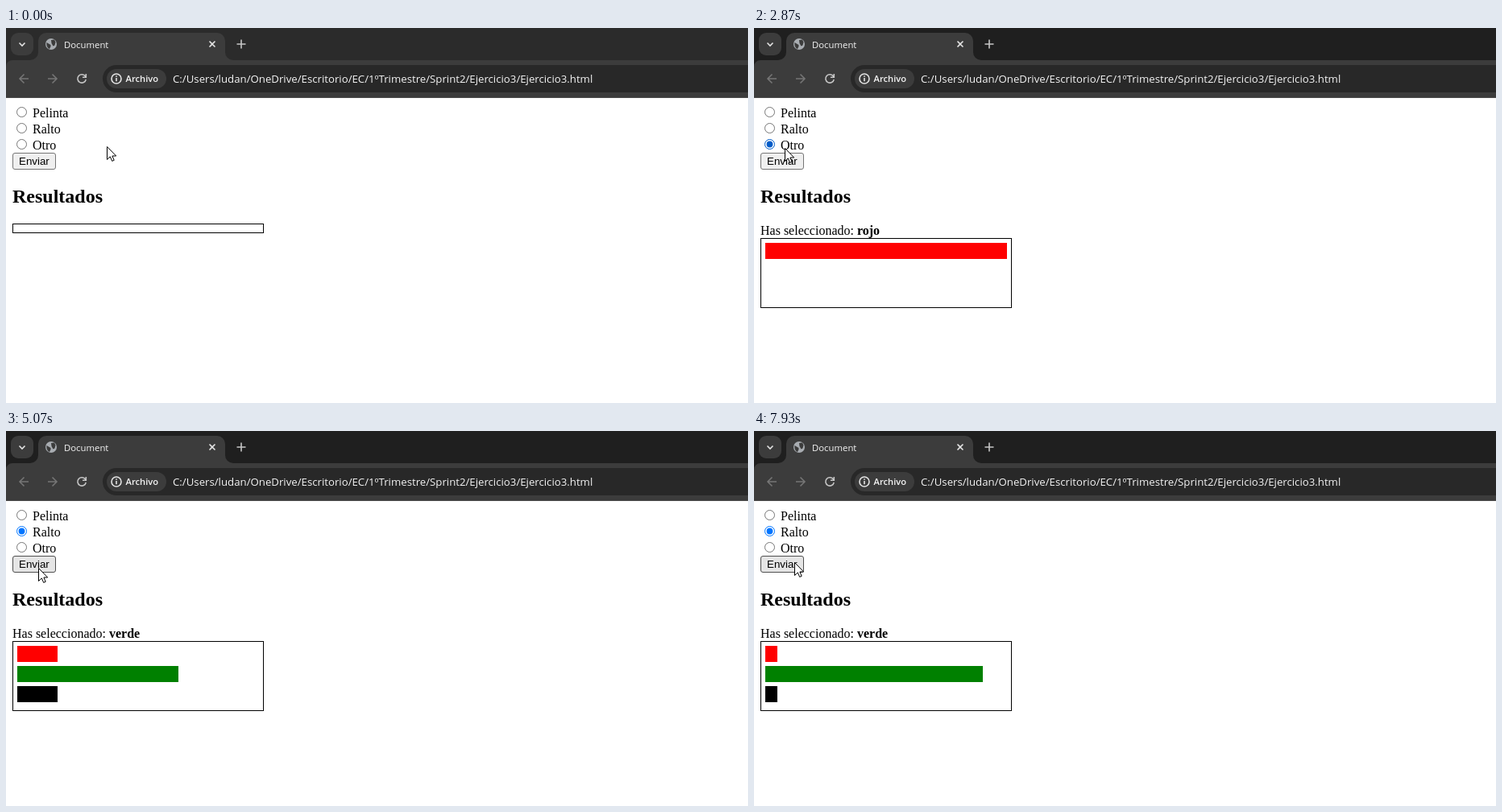
An HTML page that plays this animation: 921x466 px, repeating every 8000 ms.

```html
<!DOCTYPE html>
<html lang="es">
<head>
<meta charset="utf-8">
<title>Document</title>
<style>
  html, body { margin: 0; width: 100%; height: 100%; overflow: hidden; background: #fff; }
  svg { display: block; width: 100%; height: 100%; }
  text { white-space: pre; }
  .ui { font-family: "Open Sans", "Noto Sans", sans-serif; fill: #f4f4f4; }
  .page { font: 16px "Liberation Serif", "Times New Roman", serif; }
  .control { font: 13.333px "Liberation Sans", Arial, sans-serif; }
  .icon { fill: none; stroke: #c7c7c7; stroke-width: 1.6; }
  .dim { stroke: #757575; }
  .bright { stroke: #e3e3e3; }
</style>
</head>
<body>
<svg viewBox="0 0 921 466" xmlns="http://www.w3.org/2000/svg">
  <rect width="921" height="466" fill="#fff"/>

  <!-- Tab strip -->
  <rect id="strip" width="921" height="60"/>
  <rect x="6" y="6" width="28" height="28" rx="9" fill="#3c3c3c"/>
  <path class="icon bright" d="M16.5 18.5l3.5 3.5 3.5-3.5"/>
  <path d="M0 87V48a8 8 0 0 1 8-8H30a10 10 0 0 0 10-10V16a10 10 0 0 1 10-10H262a10 10 0 0 1 10 10V30a10 10 0 0 0 10 10H921V87Z" fill="#3c3c3c"/>
  <circle cx="56" cy="20" r="7" fill="#a9adb2"/>
  <path d="M50.5 18l5 3v2l-1.5 3c-3-1-4-5-3.5-8ZM56 15l4-.5 1.5 3-1 4-2 1-2-3.5Z" fill="#3c3c3c"/>
  <text class="ui" x="72" y="25" font-size="11.35">Document</text>
  <path class="icon bright" d="M252.5 16.5l7 7m0-7l-7 7"/>
  <path class="icon" d="M286.5 20h11m-5.500-5.500v11"/>

  <!-- Toolbar -->
  <path class="icon dim" d="M28 63H17m5.500-5.500L17 63l5.500 5.500"/>
  <path class="icon dim" d="M52 63H63m-5.500-5.500L63 63l-5.500 5.500"/>
  <path class="icon" d="M98.5 60.2a5.200 5.200 0 1 0 .7 3.600M99.300 57v4.200H95"/>
  <rect x="120" y="46" width="830" height="34" rx="17" fill="#282828"/>
  <rect x="125" y="51" width="74" height="24" rx="12" fill="#3c3c3c"/>
  <circle class="icon bright" cx="137" cy="63" r="6"/>
  <path class="icon bright" d="M137 62v4.200m0-7v1.500"/>
  <text class="ui" x="148.5" y="67" font-size="11.2" font-weight="600">Archivo</text>
  <text class="ui" x="207" y="68" font-size="13.23">C:/Users/ludan/OneDrive/Escritorio/EC/1ºTrimestre/Sprint2/Ejercicio3/Ejercicio3.html</text>
  <rect y="86" width="921" height="1" fill="#4a4a4a"/>

  <!-- Form -->
  <g id="radios" class="page"></g>
  <rect id="button" x="8.5" y="155.5" width="53" height="20" rx="2.5"/>
  <text class="control" x="16" y="170">Enviar</text>

  <!-- Results -->
  <g class="page">
    <text x="8" y="217" font-size="24" font-weight="700">Resultados</text>
    <text id="answer" x="8" y="257">Has seleccionado: <tspan id="choice" font-weight="700"></tspan></text>
  </g>
  <rect id="frame" x="8.5" width="311" fill="none" stroke="#000"/>
  <g id="bars"></g>

  <path id="cursor" d="M.5 .5v16l3.800-3.600 2.400 5.500 2.500-1.100L6.900 12h4.800Z" fill="#fff" stroke="#000"/>
</svg>
<script>
const LOOP = 8000, TICKS_PER_MS = 0.015, ROW = 20, BAR_MAX = 300, BUTTON = 3;
const options = [
  { label: "Pelinta", name: "rojo", color: "#f00" },
  { label: "Ralto", name: "verde", color: "#008000" },
  { label: "Otro", name: "negro", color: "#000" }
];

// Border and fill by mood: idle, hovered, pressed
const greys = ["#767676", "#4f4f4f", "#8d8d8d"];
const blues = ["#0075ff", "#005cc8", "#3795ff"];
const faces = ["#efefef", "#e5e5e5", "#f5f5f5"];

// The pointer's script, in ticks
const moves = [], clicks = [];
const move = (start, end, x, y) => moves.push({ start, end, x, y });
const click = (press, release) => clicks.push({ press, release });

move(0, 4, 54, 108);
click(11, 12);
move(12, 15, 45, 186);
move(17, 20, 30, 169);
click(22, 24);
move(24, 28, 16, 128);
click(29, 30);
move(30, 32, 39, 148);
click(34, 35);
move(38, 41, 38, 149);
move(43, 46, 37, 167);
click(47, 49);
move(49, 55, 44, 125);
click(56, 57);
move(57, 60, 47, 186);
move(61, 63, 40, 170);
// Steady rapid clicking on the button
for (let i = 0; i < 18; i++) {
  const release = 67 + Math.ceil(i * 2.75);
  click(release - 1, release);
}
move(116, 119, 50, 163);

const $ = id => document.getElementById(id);

function set(el, attrs) {
  for (const key in attrs) el.setAttribute(key, attrs[key]);
}

function make(parent, tag, attrs) {
  const el = document.createElementNS("http://www.w3.org/2000/svg", tag);
  set(el, attrs);
  return parent.appendChild(el);
}

const radios = options.map((option, i) => {
  const group = $("radios"), center = { cx: 19.5, cy: 104.5 + ROW * i };
  make(group, "text", { x: 33, y: 111 + ROW * i }).textContent = option.label;
  return {
    ring: make(group, "circle", { ...center, r: 6, fill: "#fff" }),
    dot: make(group, "circle", { ...center, r: 3.9 })
  };
});
const bars = options.map(({ color }, i) =>
  make($("bars"), "rect", { x: 14, y: 267 + 25 * i, height: 20, fill: color }));

function pointerAt(tick) {
  let x = 125, y = 147;
  for (const m of moves) {
    if (tick <= m.start) break;
    const left = 1 - Math.min(1, (tick - m.start) / (m.end - m.start));
    const eased = 1 - left * left;
    x += (m.x - x) * eased;
    y += (m.y - y) * eased;
  }
  return { x: Math.round(x), y: Math.round(y) };
}

// Index of the option under the pointer, BUTTON, or -1
function hit({ x, y }) {
  if (x >= 8 && x < 62 && y >= 155 && y < 176) return BUTTON;
  const top = y - 96, row = Math.floor(top / ROW);
  const inside = x >= 13 && x < 66 && row >= 0 && row < 3 && top % ROW < 17;
  return inside ? row : -1;
}

function stateAt(tick) {
  const state = { selected: -1, last: -1, counts: [0, 0, 0], pressed: false };
  for (const { press, release } of clicks) {
    if (press > tick) break;
    if (release > tick) { state.pressed = true; break; }
    const target = hit(pointerAt(press));
    if (target === BUTTON) {
      state.last = state.selected;
      state.counts[state.last]++;
    } else if (target >= 0) {
      state.selected = target;
    }
  }
  return state;
}

function draw(ms) {
  const tick = Math.floor(ms * TICKS_PER_MS + 0.06);
  const pos = pointerAt(tick);
  const over = hit(pos);
  const { selected, last, counts, pressed } = stateAt(tick);
  const mood = i => i !== over ? 0 : pressed ? 2 : 1;

  // The window is out of focus until the first press
  set($("strip"), { fill: tick < clicks[0].press ? "#2b2b2b" : "#1f1f1f" });

  radios.forEach(({ ring, dot }, i) => {
    const on = i === selected;
    const color = (on ? blues : greys)[mood(i)];
    set(ring, { stroke: color });
    set(dot, { fill: on ? color : "none" });
  });
  set($("button"), { fill: faces[mood(BUTTON)], stroke: greys[mood(BUTTON)] });

  const shown = last >= 0;
  const total = counts.reduce((a, b) => a + b) || 1;
  set($("answer"), { visibility: shown ? "visible" : "hidden" });
  $("choice").textContent = shown ? options[last].name : "";
  set($("frame"), { y: shown ? 261.5 : 243.5, height: shown ? 86 : 11 });
  bars.forEach((bar, i) => set(bar, { width: Math.round(BAR_MAX * counts[i] / total) }));

  set($("cursor"), { transform: `translate(${pos.x} ${pos.y})` });
}

const start = performance.now();
function loop() {
  draw((performance.now() - start) % LOOP);
  requestAnimationFrame(loop);
}
draw(0);
requestAnimationFrame(loop);
</script>
</body>
</html>
```
